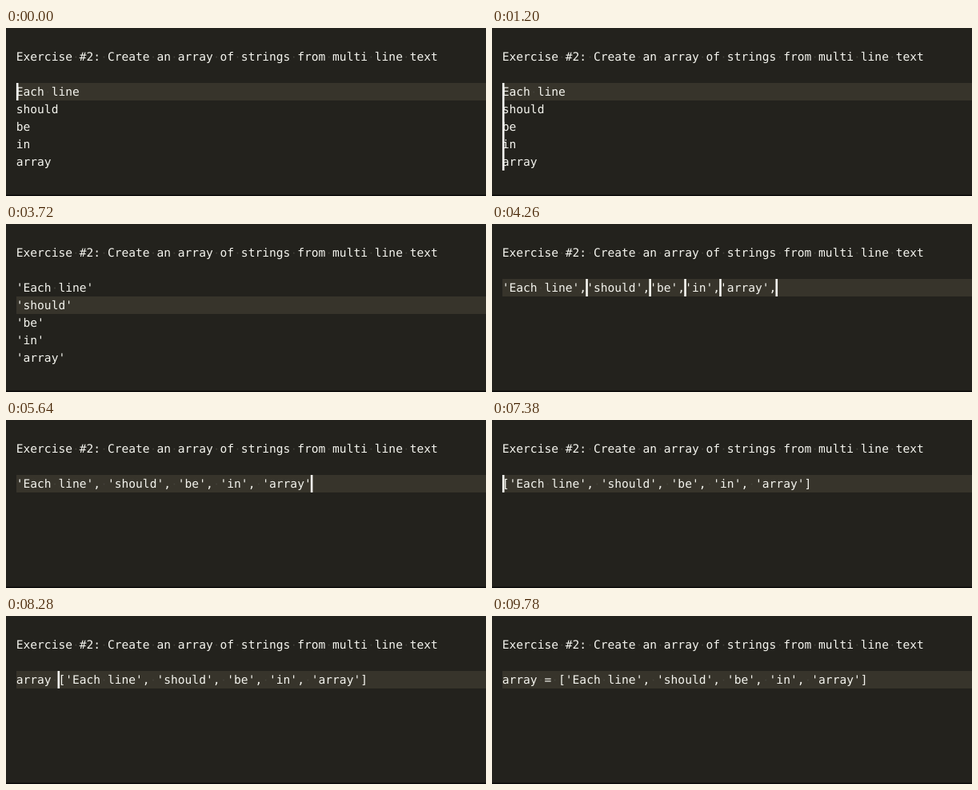
These frames come from a looping animation (600x211 px, 9.84 s). An HTML page with a canvas:

```html
<!DOCTYPE html>
<html lang="en">
<head>
<meta charset="utf-8">
<title>Multi-caret editing</title>
<style>
html, body { margin: 0; width: 100%; height: 100%; overflow: hidden; background: #23221d; }
canvas { display: block; width: 600px; height: 211px; }
</style>
</head>
<body>
<canvas id="stage"></canvas>
<script>
const W = 600, H = 211, LOOP = 9840, BLINK = 300;
const LEFT = 12.7, TOP = 69, ROW = 22, BASE = 16;
const COLOR = {
  back: '#23221d', line: '#37342b', select: '#494c4c',
  text: '#f4f4ee', dot: '#45443c', caret: '#f8f8f2', edge: '#0a0a0a'
};
const TITLE = 'Exercise #2: Create an array of strings from multi line text';

const canvas = document.getElementById('stage');
const ctx = canvas.getContext('2d');
const dpr = window.devicePixelRatio || 1;
canvas.width = W * dpr;
canvas.height = H * dpr;
ctx.scale(dpr, dpr);
ctx.font = '14.6px "DejaVu Sans Mono", monospace';
ctx.textRendering = 'geometricPrecision';
const ADV = ctx.measureText('m'.repeat(100)).width / 100;

const words = ['Each line', 'should', 'be', 'in', 'array'];
const quoted = words.map(w => `'${w}'`);

// Carets are [row, col]; selections are [row, from, to]; line is the highlighted row.
const steps = [];
function step(at, lines, carets, line = -1, selections = []) {
  steps.push({ at, lines, carets, line, selections });
}

// Text on one row with a caret after each item.
function joined(at, sep) {
  let col = 0;
  const carets = quoted.map(q => [0, col += q.length + sep.length]);
  step(at, [quoted.map(q => q + sep).join('')], carets, 0);
}

// One caret per row, then select every row and wrap it in quotes.
step(-120, words, [[0, 0]], 0);
for (let n = 1; n < 5; n++) {
  step(480 + n * 180, words, words.slice(0, n + 1).map((w, r) => [r, 0]), 0);
}
step(1560, words, words.map((w, r) => [r, w.length]), -1, words.map((w, r) => [r, 0, w.length]));
const inner = words.map((w, r) => [r, w.length + 1]);
step(2340, quoted, inner, -1, words.map((w, r) => [r, 1, w.length + 1]));

// Move right past the quotes to the next rows, then join.
step(3120, quoted, inner, 0);
step(3240, quoted, words.map((w, r) => [r, w.length + 2]), 0);
step(3420, quoted, words.map((w, r) => [r + 1, 0]), 1);
joined(3840, '');
joined(4260, ',');
joined(4620, ', ');

// Trim the tail, select the row and wrap it in brackets.
const list = quoted.join(', ');
const end = list.length;
step(5160, [list + ', '], [[0, end + 2]], 0);
step(5640, [list], [[0, end]], 0);
step(5880, [list], [[0, 0]], -1, [[0, 0, end]]);
step(7020, [`[${list}]`], [[0, 1]], -1, [[0, 1, end + 1]]);

// Type the assignment.
[7380, 7620, 7740, 7860, 7980, 8100, 8280, 8580, 8880].forEach((at, n) => {
  step(at, ['array = '.slice(0, n) + `[${list}]`], [[0, n]], 0);
});

const colX = col => LEFT + col * ADV;
const rowY = row => TOP + row * ROW;

function rect(color, x, y, w, h) {
  ctx.fillStyle = color;
  ctx.fillRect(x, y, w, h);
}

function drawText(text, top) {
  ctx.fillStyle = COLOR.text;
  ctx.fillText(text, LEFT, top + BASE);
  [...text].forEach((c, i) => {
    if (c === ' ') rect(COLOR.dot, colX(i + 0.5) - 0.8, top + 10.7, 1.6, 1.6);
  });
}

function drawSelection([row, from, to]) {
  ctx.fillStyle = COLOR.select;
  ctx.beginPath();
  ctx.roundRect(colX(from) + 0.3, rowY(row) + 0.5, (to - from) * ADV, ROW - 0.5, 3);
  ctx.fill();
}

function drawCaret([row, col]) {
  const x = col ? colX(col) + 0.4 : 14.2;
  rect(COLOR.caret, x - 1.3, rowY(row), 2.6, ROW);
}

function draw(t) {
  const s = steps.findLast(s => s.at <= t);
  rect(COLOR.back, 0, 0, W, H);
  if (s.line >= 0) rect(COLOR.line, 13, rowY(s.line), W - 13, ROW);
  s.selections.forEach(drawSelection);
  drawText(TITLE, 25);
  s.lines.forEach((text, row) => drawText(text, rowY(row)));
  if (Math.floor((t - s.at) / BLINK) % 2 === 0) s.carets.forEach(drawCaret);
  rect(COLOR.edge, 0, 209.5, W, 1.5);
}

const start = performance.now();
function tick() {
  draw((performance.now() - start) % LOOP);
  requestAnimationFrame(tick);
}
tick();
</script>
</body>
</html>
```
